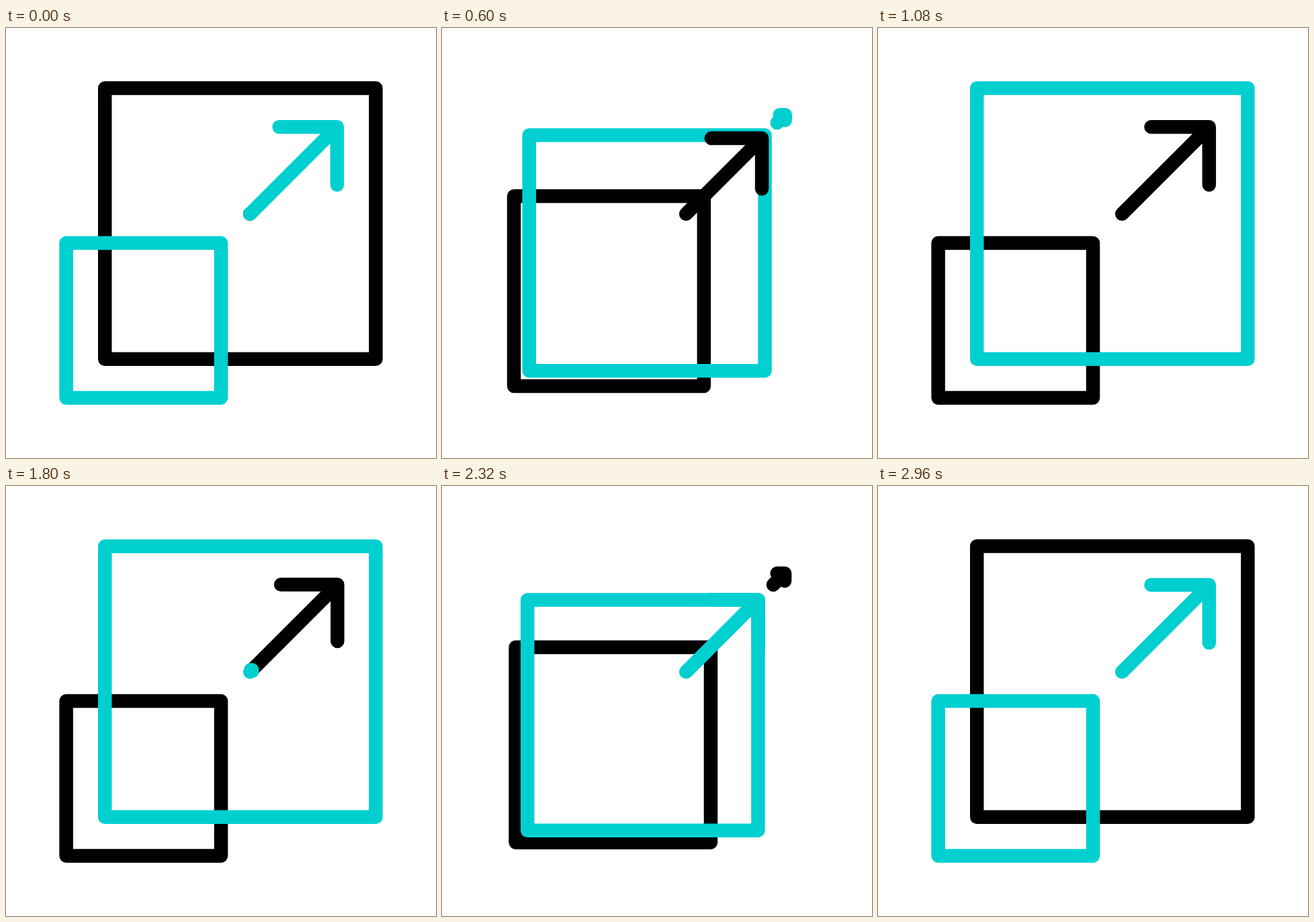
These frames come from a looping animation (640 px wide and 640 px high, 3600 ms). An HTML page:

```html
<!DOCTYPE html>
<html lang="en">
<head>
<meta charset="utf-8">
<title>Scale up</title>
<style>
  html, body { margin: 0; width: 100%; height: 100%; overflow: hidden; background: #fff; }
  svg { display: block; width: 100%; height: 100%; }
  path { fill: none; stroke-width: 20.5; stroke-linecap: round; stroke-linejoin: round; }
  .dark { stroke: #000; }
  .cyan { stroke: #00cfd0; }
</style>
</head>
<body>
<svg viewBox="0 0 640 640">
  <path id="darkBox" class="dark"/>
  <path id="cyanBox" class="cyan"/>
  <path id="darkArrow" class="dark"/>
  <path id="cyanArrow" class="cyan"/>
</svg>
<script>
const LOOP = 3600;
const SMALL = [89.6, 320, 230.4];   // x, y, side
const LARGE = [147.2, 89.6, 403.2];
const TAIL = [363.2, 276.8];
const VANISH = [512.7, 127.3];

// Each phase swaps the roles of the two colours.
const PHASES = [
  { start: 0, boxes: 1080, grow: 'cyan', shrink: 'dark' },
  { start: 1780, boxes: 1180, grow: 'dark', shrink: 'cyan' }
];
const ARROW_OUT = 980, ARROW_IN = 1080;

function bezier(x1, y1, x2, y2) {
  const at = (a, b, s) => 3 * a * s * (1 - s) ** 2 + 3 * b * s * s * (1 - s) + s ** 3;
  return x => {
    if (x <= 0) return 0;
    if (x >= 1) return 1;
    let lo = 0, hi = 1;
    for (let i = 0; i < 30; i++) {
      const mid = (lo + hi) / 2;
      if (at(x1, x2, mid) < x) lo = mid; else hi = mid;
    }
    return at(y1, y2, lo);
  };
}
const boxEase = bezier(0.75, 0, 0.25, 1);
const arrowEase = bezier(0.167, 0.167, 0.25, 1);

const draw = (id, d) => document.getElementById(id).setAttribute('d', d);

function boxPath(p) {
  const [x, y, side] = SMALL.map((v, i) => v + (LARGE[i] - v) * p);
  return `M${x} ${y}h${side}v${side}h${-side}z`;
}

// Arrow scaled by k about a fixed point; the stroke keeps its weight.
function arrowPath([ox, oy], k) {
  if (k <= 0) return '';
  const pt = (x, y) => `${ox + (x - ox) * k} ${oy + (y - oy) * k}`;
  const tip = pt(492.8, 147.2);
  return `M${pt(...TAIL)}L${tip}M${pt(406.4, 147.2)}L${tip}L${pt(492.8, 233.6)}`;
}

function render(time) {
  const t = time % LOOP;
  const { start, boxes, grow, shrink } = PHASES[t < PHASES[1].start ? 0 : 1];
  const dt = t - start;
  const p = boxEase(dt / boxes);
  draw(grow + 'Box', boxPath(p));
  draw(shrink + 'Box', boxPath(1 - p));
  draw(grow + 'Arrow', arrowPath(VANISH, 1 - arrowEase(dt / ARROW_OUT)));
  draw(shrink + 'Arrow', arrowPath(TAIL, arrowEase(dt / ARROW_IN)));
}

const origin = performance.now();
function tick() {
  render(performance.now() - origin);
  requestAnimationFrame(tick);
}
tick();
</script>
</body>
</html>
```
